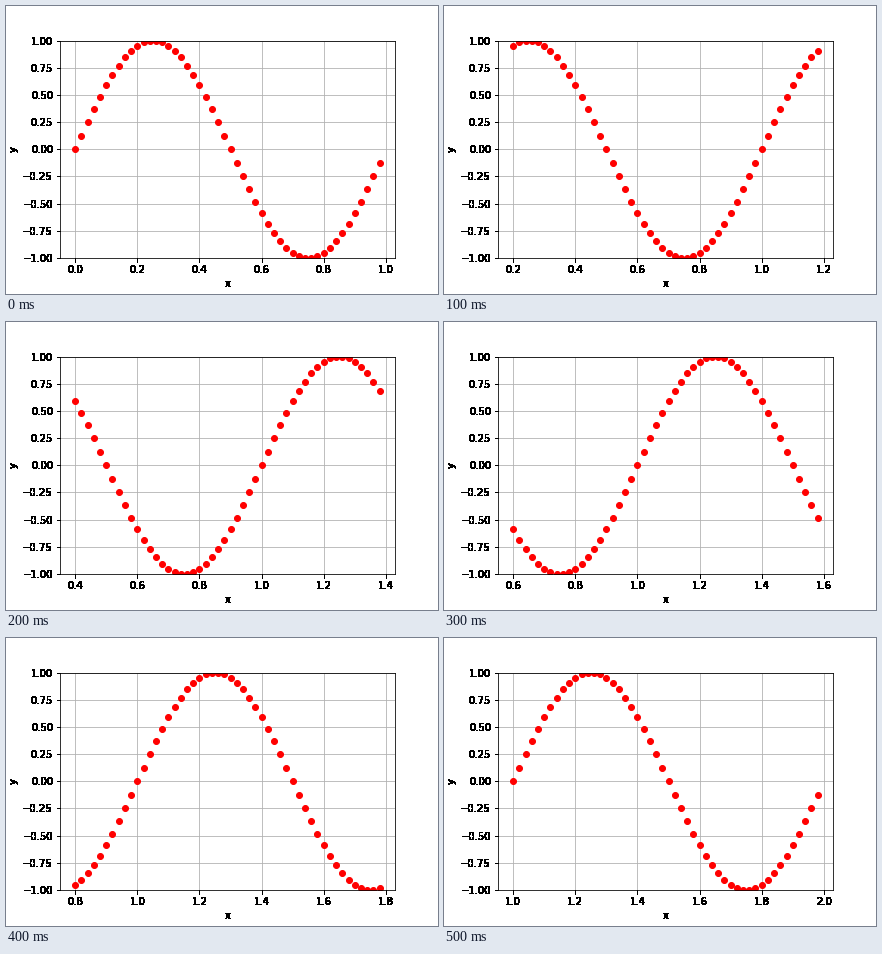
Write a matplotlib script that moves like this. It is 432 px wide and 288 px high and loops after 0.6 s.

```python
import numpy as np
import matplotlib.pyplot as plt
from matplotlib.animation import FuncAnimation

plt.rcParams["font.family"] = "DejaVu Sans"

FRAMES, INTERVAL = 6, 100
SHIFT, COUNT, STEP = 0.2, 50, 0.02

fig = plt.figure(figsize=(6, 4), dpi=72, facecolor="white")
ax = fig.add_axes([0.125, 0.125, 0.775, 0.755])
(dots,) = ax.plot([], [], "ro")
ax.set(xlabel="x", ylabel="y", ylim=(-1, 1))
ax.grid(True)


def harden(image, dpi):
    """Turn every touched pixel fully opaque, for crisp heavy lettering."""
    image = image.copy()
    image[..., 3] = image[..., 3] > 0
    return image, 0, 0


def harden_axes():
    for axis in (ax.xaxis, ax.yaxis):
        axis.label.set_agg_filter(harden)
        for tick in axis.get_major_ticks():
            tick.label1.set_agg_filter(harden)
            tick.tick1line.set_agg_filter(harden)


def update(frame):
    start = SHIFT * frame
    x = start + STEP * np.arange(COUNT)
    dots.set_data(x, np.sin(2 * np.pi * x))
    margin = 0.05 * (x[-1] - x[0])
    ax.set_xlim(x[0] - margin, x[-1] + margin)
    harden_axes()
    return (dots,)


anim = FuncAnimation(fig, update, frames=FRAMES, interval=INTERVAL,
                     init_func=lambda: update(0), repeat=True, repeat_delay=0)
plt.show()
```
